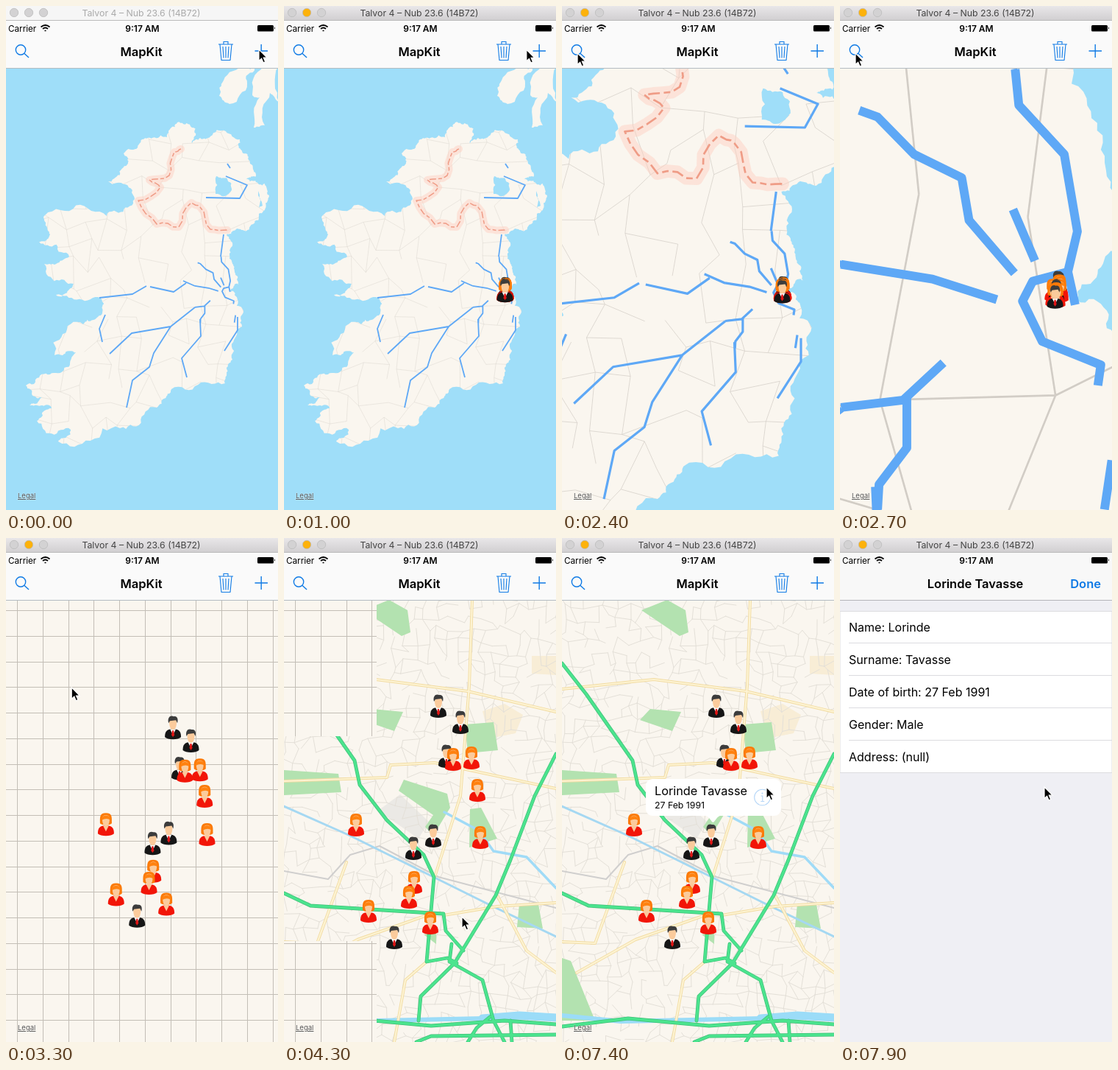
Write an HTML page with a canvas that moves like this. It is 370 px wide and 684 px high and loops after 8000 ms.

```html
<!DOCTYPE html>
<html lang="en">
<head>
<meta charset="utf-8">
<title>Map demo</title>
<style>
html, body { margin: 0; width: 100%; height: 100%; overflow: hidden; }
canvas, svg { position: absolute; left: 0; top: 0; }
text { font-family: Inter, Roboto, sans-serif; }
.blue { fill: none; stroke: #0f7ae5; stroke-width: 1.4; }
.thin { stroke-width: 1.1; }
</style>
</head>
<body>
<canvas id="map" width="370" height="684"></canvas>
<svg width="370" height="684" viewBox="0 0 370 684">
  <defs>
    <linearGradient id="bar" x2="0" y2="1"><stop stop-color="#e9e7e9"/><stop offset="1" stop-color="#d1cfd1"/></linearGradient>
  </defs>
  <text x="16" y="668" font-size="9.5" fill="#555" stroke="#fff" stroke-opacity=".4" paint-order="stroke" text-decoration="underline">Legal</text>

  <g id="callout">
    <rect x="114" y="327" width="184" height="50" rx="9" fill="#fff"/>
    <path d="M193 376C201 377 203 386 205.500 386S210 377 218 376z" fill="#fff"/>
    <text x="126" y="349" font-size="16.300">Lorinde Tavasse</text>
    <text x="126" y="367" font-size="12.300">27 Feb 1991</text>
    <g id="info"><circle cx="272.500" cy="352" r="10.800" class="blue thin"/><path d="M270.500 350h2.300v7.500m-2.500 0h5" class="blue thin"/><circle cx="272.500" cy="346.500" r="1.100" fill="#0f7ae5"/></g>
  </g>

  <path d="M0 19H370V84H0z" fill="#fafafa"/>
  <path d="M0 84.500H370" stroke="#b3bcc2"/>
  <text x="184" y="68" font-size="16.600" font-weight="600" text-anchor="middle">MapKit</text>
  <g id="search" class="blue"><circle cx="20" cy="59.500" r="6.700"/><path d="M25 64.500 31 70"/></g>
  <path class="blue thin" d="M289 52H309M296 52V48.500H302V52M291 52 293 73.500H305L307 52M295 55 296 70.500M299 55V70.500M303 55 302 70.500"/>
  <path id="plus" class="blue" d="M338.500 61H356M347.200 52V70"/>

  <g id="sheet">
    <path d="M0 20H370V684H0z" fill="#efeff4"/>
    <path d="M0 20H370V84H0z" fill="#f8f8f8"/>
    <path d="M0 84.500H370" stroke="#b5b5b9"/>
    <path d="M0 99.500H370V318.500H0z" fill="#fff" stroke="#dcdce0"/>
    <text x="184" y="68" font-size="16.500" font-weight="600" text-anchor="middle">Lorinde Tavasse</text>
    <text x="355" y="68" font-size="16.500" font-weight="600" text-anchor="end" fill="#0f7ae5">Done</text>
    <g id="rows" font-size="16"></g>
  </g>

  <text x="3" y="34.500" font-size="11.700">Carrier</text>
  <path d="M47.500 28.500q6-5 12 0M50 31q3.500-3 7 0M52.500 33.500h2" fill="none" stroke="#000" stroke-width="1.700"/>
  <text x="185.500" y="34.500" font-size="12" font-weight="600" text-anchor="middle">9:17 AM</text>
  <rect x="342" y="26" width="22" height="8.500" rx="1.500"/><path d="M365 28.500q2 1.500 0 3z"/>

  <path id="title" d="M0 0H370V19H0z"/>
  <path d="M0 19.500H370" stroke="#bbb"/>
  <g stroke="#bcbcbc" stroke-width=".8" fill="#d3d2d3"><circle cx="11" cy="9" r="5.700"/><circle id="yellow" cx="31" cy="9" r="5.700"/><circle cx="51" cy="9" r="5.700"/></g>
  <text id="name" x="184" y="14" font-size="12.300" text-anchor="middle">Talvor 4 – Nub 23.6 (14B72)</text>

  <path id="cursor" d="M0 0V15.500L3.600 12.200 6 17.800 8.700 16.700 6.300 11.200H11z" stroke="#fff" stroke-width="1.200"/>
</svg>
<script>
const $ = id => document.getElementById(id);
const W = 370, H = 684, LOOP = 8000;
const ctx = $('map').getContext('2d');
const SEA = '#9fdef9', LAND = '#faf6ef';

let seed = 11;
const rnd = () => (seed = (seed * 16807) % 2147483647) / 2147483647;
const clamp = v => Math.max(0, Math.min(1, v));
const smooth = v => (v = clamp(v), v * v * (3 - 2 * v));
const path = s => new Path2D(s.split('|').map(p => 'M' + p).join(''));

// Ragged line: repeatedly push midpoints sideways
function ragged(s, rounds, amount, closed = true) {
  let pts = s.split(' ').map(p => p.split(',').map(Number));
  while (rounds--) pts = pts.flatMap((p, i) => {
    if (!closed && i == pts.length - 1) return [p];
    const q = pts[(i + 1) % pts.length], k = (rnd() - .5) * amount;
    const dx = q[0] - p[0], dy = q[1] - p[1];
    return [p, [(p[0] + q[0]) / 2 - dy * k, (p[1] + q[1]) / 2 + dx * k]];
  });
  return new Path2D('M' + pts.join(' ') + (closed ? 'z' : ''));
}
// Road network: a jittered grid with some links left out
function net(cell, keep) {
  const p = new Path2D(), cols = Math.ceil(W / cell) + 1, nodes = [];
  for (let y = 80; y < H + cell; y += cell)
    for (let i = 0; i < cols; i++)
      nodes.push([(i + (rnd() - .5) * .9) * cell, y + (rnd() - .5) * .9 * cell]);
  nodes.forEach((a, i) => {
    const right = (i + 1) % cols && nodes[i + 1];
    for (const b of [right, nodes[i + cols]])
      if (b && rnd() < keep) { p.moveTo(...a); p.lineTo(...b); }
  });
  return p;
}
function stroke(c, p, color, width, dash = []) {
  c.strokeStyle = color; c.lineWidth = width; c.setLineDash(dash); c.stroke(p);
}
function fill(c, p, color) { c.fillStyle = color; c.fill(p); }

// ---- Island map ----
const land = ragged('233,158 258,176 252,186 278,177 318,181 330,205 339,232 326,234 352,241 358,258 344,282 322,304 300,310 304,343 312,363 317,378 312,377 305,387 314,395 321,435 308,480 298,512 225,520 205,545 155,573 71,591 88,575 42,563 62,546 32,541 52,530 27,515 65,498 95,470 66,474 105,432 131,417 125,395 68,392 92,377 52,350 86,340 45,320 60,310 53,284 137,285 175,262 139,238 165,215 160,200 185,181 219,178', 4, .5);
const islets = [
  ragged('326,84 296,101 290,122 304,133 328,105 338,84', 3, .5),
  ragged('350,82 335,120 345,124 337,165 352,162 359,118 371,130 371,82', 3, .35)
];
const lakes = [
  ragged('286,231 301,234 307,250 297,258 285,255', 3, .35),
  ragged('343,251 349,271 344,274', 2, .3)
];
const border = ragged('238,194 229,198 222,230 195,236 210,246 180,264 205,296 235,300 252,267 264,273 278,303 301,304', 2, .3, false);
const lanes = net(27, .65);
const motorways = path('301,214 305,220|299,231 328,243 318,261 272,260|127,396 172,391 191,380|196,381 228,388 245,376|241,373 257,380|135,419 127,438 131,456|141,472 171,444 224,435 257,409|224,435 201,471 195,490 172,508 164,545|264,425 265,448 239,478 246,504|315,422 315,440 297,468|296,310 292,340');
// Close-up of the capital, drawn at 6.7 times the island scale
const ringRoads = path('238,84 243,133 305,200 323,305 310,360 262,373 248,400 275,455 355,487 351,515|310,360 320,405|25,140 50,149 100,200 165,232 175,290 237,362|235,275 265,345|0,350 125,370 213,398|0,545 85,535 140,484|90,530 90,600 52,650 50,684|370,617 360,684');

function drawIsland(s) {
  ctx.fillStyle = SEA; ctx.fillRect(0, 0, W, H);
  ctx.save();
  ctx.setTransform(s, 0, 0, s, FX - FX * s, FY - FY * s);
  [land, ...islets].forEach(p => fill(ctx, p, LAND));
  ctx.save(); ctx.clip(land);
  stroke(ctx, lanes, '#d2cdc6', .4);
  ctx.restore();
  lakes.forEach(p => fill(ctx, p, SEA));
  ctx.lineJoin = ctx.lineCap = 'round';
  stroke(ctx, border, 'rgba(252,205,188,.45)', 10);
  ctx.lineCap = 'butt';
  stroke(ctx, border, '#ef9c86', 1.5, [9, 3, 5, 3]);
  stroke(ctx, motorways, '#5ea8f6', 1.8);
  ctx.translate(301, 385); ctx.scale(1 / 6.7, 1 / 6.7); ctx.translate(-295, -385);
  stroke(ctx, ringRoads, '#5ea8f6', 12);
  ctx.restore();
}

// ---- Street map ----
const city = document.createElement('canvas');
city.width = W; city.height = H;
function drawCity() {
  const c = city.getContext('2d');
  c.lineJoin = c.lineCap = 'round';
  c.fillStyle = LAND; c.fillRect(0, 0, W, H);
  fill(c, path('270,235 300,225 325,240 315,265 280,272|337,160 370,160 370,186 337,184'), '#f8edd6');
  fill(c, path('128,370 158,348 197,385 183,408'), '#ebe9e5');
  stroke(c, net(15, .62), '#e4e0d8', 1);
  fill(c, path('108,98 143,84 168,98 172,128 160,133|106,247 120,232 162,236 150,262|0,315 74,320 78,345 0,349|246,253 285,250 291,288 250,292|156,343 163,328 222,347 226,366 203,404 192,392 203,376|320,497 346,497 352,530 317,528|0,570 12,574 45,655 0,655|253,368 268,366 290,408 252,420|190,538 207,536 207,551'), '#b3e2b0');
  stroke(c, path('0,452 60,463 90,430 130,418 210,460 370,502'), '#d0cfce', 2);
  stroke(c, path('0,364 90,404 280,498 370,541'), '#a5d8f2', 3);
  stroke(c, path('218,372 265,397 285,425 330,433 370,475'), '#a0dbf7', 3.5);
  stroke(c, path('0,648 80,656 270,652'), '#9bdcf8', 6);
  stroke(c, path('270,652 320,648 370,651'), '#9bdcf8', 11);
  const yellow = path('0,205 125,192 250,208 370,236|256,84 252,200 240,350 205,460|0,330 140,325 145,308 205,305 370,340|20,590 100,545 200,510|217,512 290,500 370,495|0,548 45,550 85,440|150,684 165,600 194,575|290,485 330,560 370,590');
  stroke(c, yellow, '#f2dca3', 4); stroke(c, yellow, '#fdf3d2', 2.2);
  const green = path('0,170 33,212 96,302 103,335 140,383 190,430 204,460 194,575 222,570 235,577|0,482 36,499 217,510 220,533 244,560|370,293 341,350 308,437 288,485 232,577 186,622 183,655|228,551 225,575 270,600 285,655 300,684|0,663 90,652 200,662 300,655 370,660|180,684 200,676 370,674|250,684 262,665 280,650|310,684 308,655');
  stroke(c, green, '#3fbf77', 4.8); stroke(c, green, '#4be48e', 3.4);
}
drawCity();

// Tiles load right column first, centre row first
const TILE = 278, GRID = TILE / 8;
function drawTiles(t) {
  ctx.fillStyle = LAND; ctx.fillRect(0, 0, W, H);
  ctx.fillStyle = '#c3beb6';
  for (let x = 15; x < W; x += GRID) ctx.fillRect(Math.round(x), 0, 1, H);
  for (let y = 98; y < H; y += GRID) ctx.fillRect(0, Math.round(y), W, 1);
  let at = 3600;
  for (const x of [126, 126 - TILE])
    for (const row of [1, 0, 2]) {
      const y = row * TILE - 9;
      if (t >= at) ctx.drawImage(city, x, y, TILE, TILE, x, y, TILE, TILE);
      at += 220;
    }
}

// ---- People ----
const FX = 302.05, FY = 384.9, ZOOM = 107;
const people = 'M210,228 M240,250 M221,296 W255,298 W230,300 W263,342 W98,389 M203,404 W267,406 M176,421 W177,467 W170,487 W115,506 W199,522 M150,542'
  .split(' ').map(p => [p[0] == 'M', ...p.slice(1).split(',').map(Number)]);
const body = path('-11,13 C-11,5 -8,3 -3,2 L3,2 C8,3 11,5 11,13 C7,17 -7,17 -11,13z');
const face = path('-5,-7 C-5,-14 5,-14 5,-7 C5,-1 3,3 0,3 C-3,3 -5,-1 -5,-7z');
const shortHair = path('-6,-6 C-8,-14 -3,-17 1,-15 C7,-16 7,-10 6,-6 L4,-10 -4,-9z');
const bob = path('-8,-1 C-8,-9 -9,-15 0,-15 C9,-15 8,-9 8,-1 C5,2 -5,2 -8,-1z');
const fringe = path('-6,-5 C-7,-14 7,-14 6,-5 C3,-8 -1,-8 -6,-5z');
const collar = path('-4,2 L4,2 0,10z');
const tie = path('-1,4 L1,4 2,10 0,13 -2,10z');
function drawPerson(man, x, y) {
  ctx.save(); ctx.translate(x, y);
  if (!man) fill(ctx, bob, '#fb7a08');
  fill(ctx, body, man ? '#161616' : '#f21508');
  fill(ctx, collar, man ? '#fff' : '#fbc79a');
  if (man) fill(ctx, tie, '#e01414');
  fill(ctx, face, '#fbcb9c');
  fill(ctx, man ? shortHair : fringe, man ? '#3c3c3c' : '#ff8210');
  ctx.restore();
}

// ---- Detail rows ----
$('rows').innerHTML = ['Name: Lorinde', 'Surname: Tavasse', 'Date of birth: 27 Feb 1991', 'Gender: Male', 'Address: (null)']
  .map((s, i) => `<text x="12" y="${127 + 44 * i}">${s}</text>` + (i ? `<path d="M12 ${98.5 + 44 * i}H370" stroke="#dcdce0"/>` : '')).join('');

// ---- Timeline ----
// Cursor stops: arrival start, arrival end, x, y
const stops = [[0, 1, 344, 59], [900, 1700, 21, 64], [2950, 3900, 242, 514], [4600, 5200, 206, 406], [6300, 7100, 278, 338]];
function cursorAt(t) {
  let [, , x, y] = stops[0];
  for (const [from, to, nx, ny] of stops) {
    const e = smooth((t - from) / (to - from));
    x += (nx - x) * e; y += (ny - y) * e;
  }
  return [x, y];
}
const dim = (id, on) => $(id).setAttribute('opacity', on ? .3 : 1);
const place = (id, x, y) => $(id).setAttribute('transform', `translate(${x} ${y})`);

function frame(now) {
  const t = now % LOOP;
  const s = ZOOM ** smooth((t - 2100) / 1375);
  if (t < 3150) drawIsland(s); else drawTiles(t);
  if (t >= 400) for (const [man, x, y] of people)
    drawPerson(man, FX + (x - FX) * s / ZOOM, FY + (y - FY) * s / ZOOM);

  const active = t >= 100;
  $('title').setAttribute('fill', active ? 'url(#bar)' : '#f6f6f6');
  $('yellow').setAttribute('fill', active ? '#fdb20b' : '#d3d2d3');
  $('name').setAttribute('fill', active ? '#444' : '#aaa');
  dim('plus', t >= 150 && t < 400);
  dim('search', t >= 1900 && t < 2200);
  dim('info', t >= 7300);

  const pop = clamp((t - 5300) / 250);
  const k = pop + .25 * Math.sin(pop * Math.PI) * pop;
  $('callout').setAttribute('transform', `translate(205 386) scale(${k}) translate(-205 -386)`);
  $('callout').setAttribute('visibility', pop ? 'visible' : 'hidden');

  const slide = 1 - clamp((t - 7430) / 430);
  place('sheet', 0, 664 * slide ** 3);
  place('cursor', ...cursorAt(t));
  requestAnimationFrame(frame);
}
requestAnimationFrame(frame);
</script>
</body>
</html>
```
